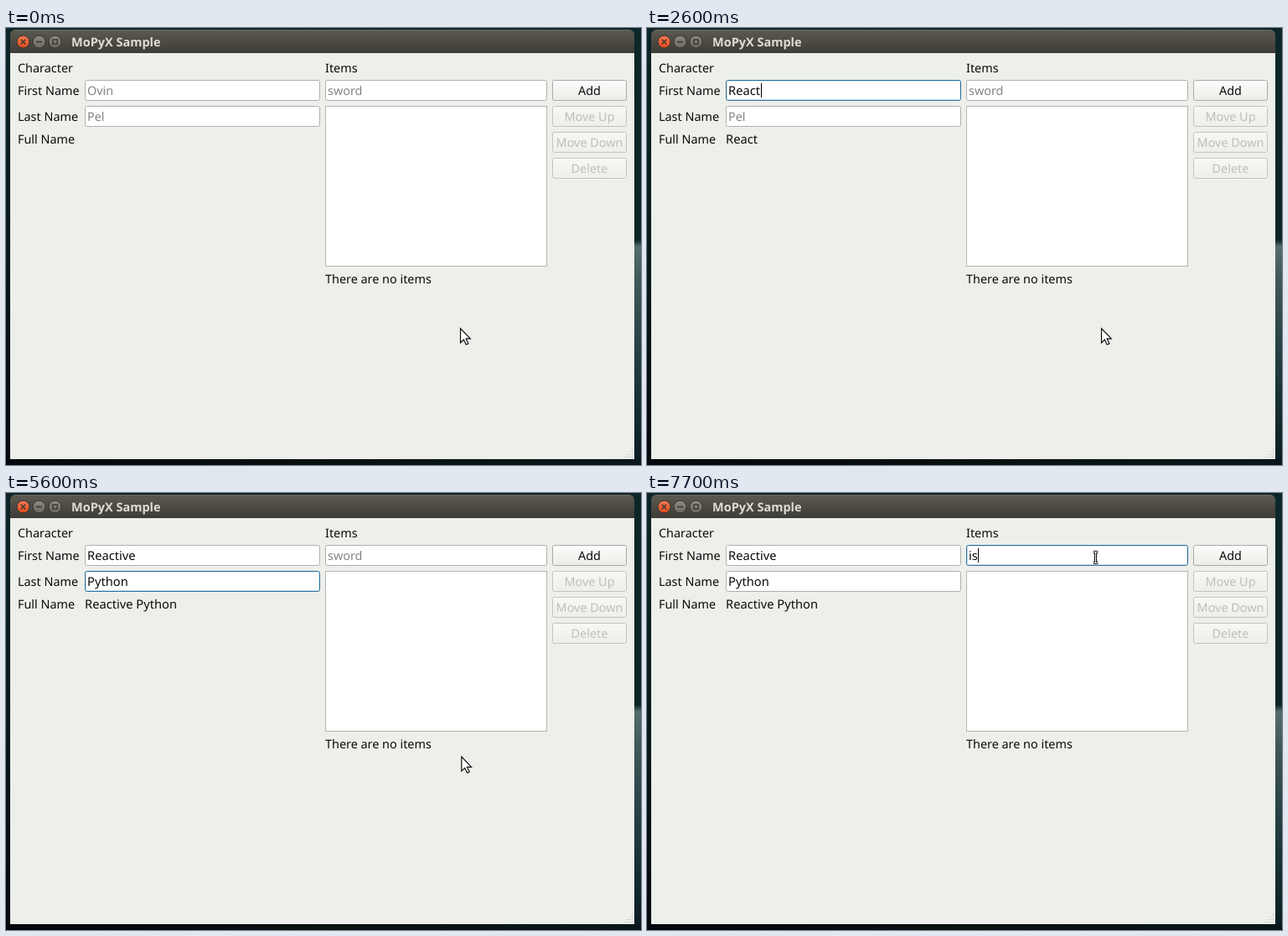
Write an HTML page that moves like this. It is 758x522 px and loops after 8000 ms.

```html
<!DOCTYPE html>
<html lang="en">
<head>
<meta charset="utf-8">
<title>MoPyX Sample</title>
<style>
  html, body { margin: 0; width: 100%; height: 100%; overflow: hidden; background: #071416; }
  svg { display: block; }
  text {
    font: 14.4px "Noto Sans", "Open Sans", sans-serif;
    text-rendering: geometricPrecision;
    white-space: pre;
    fill: #0b0b0b;
  }
  text.value { font-size: 14.7px; }
  text.hint { fill: #838383; }
  text.off { fill: #bdbfbc; }
  text.title { font-size: 14.5px; font-weight: bold; fill: #dfdbd2; }
</style>
</head>
<body>
<svg id="stage" width="758" height="522" viewBox="0 0 758 522">
  <defs>
    <linearGradient id="left" x2="0" y2="1">
      <stop offset="0" stop-color="#0b2528"/><stop offset=".55" stop-color="#08191d"/>
      <stop offset="1" stop-color="#03080d"/>
    </linearGradient>
    <linearGradient id="right" x2="0" y2="1">
      <stop offset="0" stop-color="#0c2729"/><stop offset=".485" stop-color="#0d2426"/>
      <stop offset=".5" stop-color="#566b6c"/><stop offset=".58" stop-color="#415759"/>
      <stop offset=".7" stop-color="#2b4548"/><stop offset=".85" stop-color="#163034"/>
      <stop offset="1" stop-color="#0a1b20"/>
    </linearGradient>
    <linearGradient id="base">
      <stop offset="0" stop-color="#03080d"/><stop offset=".5" stop-color="#09110e"/>
      <stop offset="1" stop-color="#08171b"/>
    </linearGradient>
    <linearGradient id="bar" x2="0" y2="1">
      <stop offset="0" stop-color="#5c5a51"/><stop offset="1" stop-color="#3d3c37"/>
    </linearGradient>
    <linearGradient id="push" x2="0" y2="1">
      <stop offset="0" stop-color="#fcfdfb"/><stop offset="1" stop-color="#ebede8"/>
    </linearGradient>
    <linearGradient id="pale" x2="0" y2="1">
      <stop offset="0" stop-color="#f6f8f4"/><stop offset="1" stop-color="#edefea"/>
    </linearGradient>
    <linearGradient id="close" x2="0" y2="1">
      <stop offset="0" stop-color="#f27a52"/><stop offset="1" stop-color="#df4a1c"/>
    </linearGradient>
    <linearGradient id="knob" x2="0" y2="1">
      <stop offset="0" stop-color="#8d8b82"/><stop offset="1" stop-color="#69675f"/>
    </linearGradient>
  </defs>

  <rect width="758" height="522" fill="url(#left)"/>
  <rect x="750" width="8" height="522" fill="url(#right)"/>
  <rect y="515" width="758" height="7" fill="url(#base)"/>

  <path d="M5 30V8a6 6 0 0 1 6-6H744a6 6 0 0 1 6 6V30Z" fill="url(#bar)"/>
  <path d="M10 2.5H745" stroke="#6c6a60"/>
  <rect x="5" y="30" width="745" height="485" fill="#edefea"/>
  <g stroke="#32312c">
    <circle cx="20.5" cy="16.5" r="7.5" fill="url(#close)"/>
    <circle cx="39.5" cy="16.5" r="7.5" fill="url(#knob)"/>
    <circle cx="58.5" cy="16.5" r="7.5" fill="url(#knob)"/>
    <path d="M17.8 13.8l5.4 5.4M23.2 13.8l-5.4 5.4M36 16.5h7M55.8 13.8h5.4v5.4h-5.4z" fill="none" stroke-width="1.3"/>
  </g>
  <g id="ui"></g>
  <path id="arrow" d="M0 0V17L3.9 13.3L6.7 19.2L9.4 18L6.6 12.2H11.8Z" fill="#fff" stroke="#111" stroke-width="1.2"/>
  <g id="beam" fill="none">
    <path d="M-2.8-6.5H2.8M0-6.5V6.5M-2.8 6.5H2.8" stroke="#111" stroke-width="3.2"/>
    <path d="M-2.8-6.5H2.8M0-6.5V6.5M-2.8 6.5H2.8" stroke="#fff" stroke-width="1"/>
  </g>
</svg>
<script>
const LOOP = 8000, STEP = 100;
const $ = id => document.getElementById(id);
const ui = $("ui");

function add(tag, attrs, content) {
  const el = document.createElementNS("http://www.w3.org/2000/svg", tag);
  for (const k in attrs) el.setAttribute(k, attrs[k]);
  if (content) el.textContent = content;
  return ui.appendChild(el);
}

const label = (x, y, s, cls = "") => add("text", { x, y, class: cls }, s);

function button(y, s, on) {
  add("rect", { x: 652.5, y: y + .5, width: 88, height: 24, rx: 2,
    fill: on ? "url(#push)" : "url(#pale)", stroke: on ? "#a7aaa6" : "#c2c4c0" });
  add("text", { x: 696.5, y: y + 18, "text-anchor": "middle", class: on ? "" : "off" }, s);
}

function field(x, y, w, hint) {
  const box = add("rect", { x: x + .5, y: y + .5, width: w - 1, height: 24, rx: 2, fill: "#fff" });
  const glow = add("rect", { x: x + 1.5, y: y + 1.5, width: w - 3, height: 22, rx: 1,
    fill: "none", stroke: "#308cc6", "stroke-opacity": .22 });
  const ghost = label(x + 3, y + 18, hint, "hint");
  const value = label(x + 3, y + 18, "", "value");
  const caret = add("rect", { y: y + 4, width: 1, height: 17, fill: "#000" });
  return (s, focus, blinkOn) => {
    box.setAttribute("stroke", focus ? "#2b6f98" : "#aeb1ad");
    show(glow, focus);
    show(ghost, !s);
    value.textContent = s;
    show(caret, focus && blinkOn);
    caret.setAttribute("x", x + 3 + (s ? Math.ceil(value.getComputedTextLength()) : 0));
  };
}

function show(el, on) { el.style.display = on ? "" : "none"; }
function place(el, x, y) { el.setAttribute("transform", `translate(${x} ${y})`); }

label(78, 22, "MoPyX Sample", "title");
label(14, 53, "Character");
label(14, 80, "First Name");
label(14, 111, "Last Name");
label(14, 138, "Full Name");
label(381, 53, "Items");
label(381, 305, "There are no items");
const first = field(94, 62, 281, "Ovin");
const last = field(94, 93, 281, "Pel");
const item = field(381, 62, 265, "sword");
const full = label(94, 138, "", "value");
add("rect", { x: 381.5, y: 93.5, width: 264, height: 191, fill: "#fff", stroke: "#b4b7b3" });
button(62, "Add", true);
button(93, "Move Up");
button(124, "Move Down");
button(155, "Delete");

// size grip
for (let i = 0; i < 4; i++)
  for (let j = 0; j <= i; j++)
    add("rect", { x: 747 - 3 * j, y: 503 + 3 * i, width: 1, height: 1, fill: "#b3b6b1" });

const typed = (s, times, t) => s.slice(0, times.filter(k => t >= k).length);
const firstKeys = [1800, 2000, 2200, 2400, 2600, 2800, 2900, 3100];
const lastKeys = [3800, 4000, 4200, 4400, 4600, 4700];
const labelKeys = [3800, 4100, 4200, 4400, 4600, 4700];
const itemKeys = [7600, 7700];
const hidden = [[900, 1500], [5400, 6000], [6900, 7500]];

function pointer(t) {
  const p = Math.min(1, Math.max(0, (t - 5400) / 800));
  const ease = p * p * (3 - 2 * p);
  const x = 542.5 - 7 * ease + 5 * Math.sin(Math.PI * ease);
  const y = t >= 6300 ? 77 : 359 - 281 * ease;
  const over = y < 87;
  show($("arrow"), !over);
  show($("beam"), over);
  place($(over ? "beam" : "arrow"), x, y);
}

function draw(ms) {
  const t = Math.floor(ms / STEP) * STEP;
  const blinkOn = !hidden.some(([a, b]) => t >= a && t < b);
  const focus = t < 200 ? 0 : t < 3400 ? 1 : t < 6300 ? 2 : 3;
  const name = typed("Reactive", firstKeys, t);
  first(name, focus === 1, blinkOn);
  last(typed("Python", lastKeys, t), focus === 2, blinkOn);
  item(typed("is", itemKeys, t), focus === 3, blinkOn);
  full.textContent = (name + " " + typed("Python", labelKeys, t)).trim();
  pointer(t);
}

const start = performance.now();
function tick() {
  draw((performance.now() - start) % LOOP);
  requestAnimationFrame(tick);
}
tick();
</script>
</body>
</html>
```
